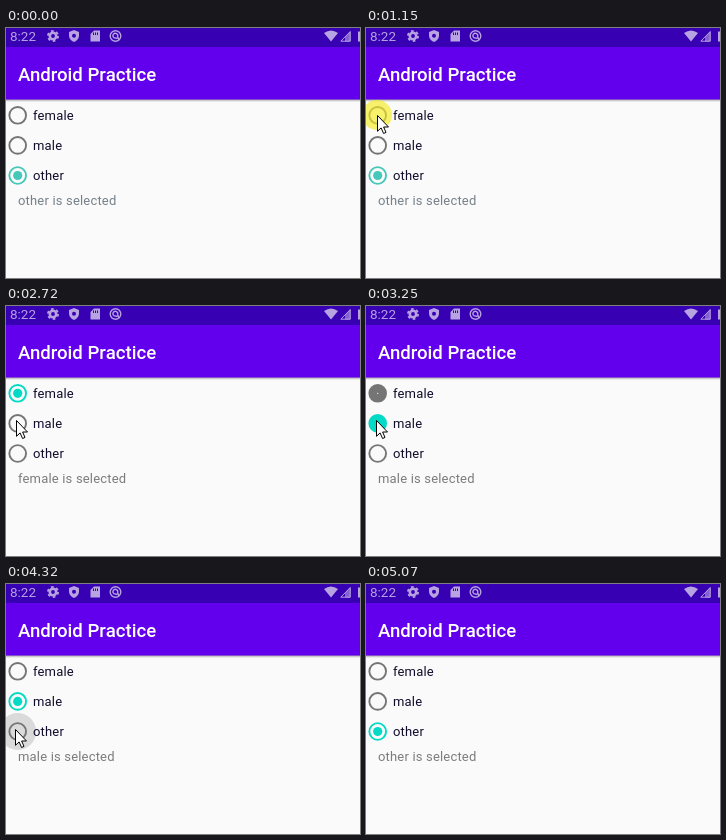
Animation of 354 by 250 pixels, one loop 5.55 s. Source, as an HTML page:

```html
<!DOCTYPE html>
<html lang="en">
<head>
<meta charset="utf-8">
<title>Radio buttons</title>
<style>
  html, body { margin: 0; width: 100%; height: 100%; overflow: hidden; background: #fafafa; }
  svg { display: block; width: 354px; height: 250px; }
  text { font: 13px Roboto, sans-serif; letter-spacing: .18px; fill: #120c2b; }
  #result { fill: #757575; }
  .title { font-size: 18.6px; font-weight: 500; letter-spacing: 0; fill: #fff; }
  .status { fill: #b7a2e2; }
  .status text { font-size: 13.5px; letter-spacing: 0; fill: inherit; }
</style>
</head>
<body>
<svg viewBox="0 0 354 250">
  <defs>
    <linearGradient id="shade" x2="0" y2="1">
      <stop stop-color="#999"/>
      <stop offset="1" stop-color="#fafafa"/>
    </linearGradient>
  </defs>
  <rect width="354" height="250" fill="#fafafa"/>
  <circle id="ripple" cx="11.7" r="18.5"/>
  <g id="radios"></g>
  <text id="result" x="12" y="177"></text>
  <rect y="71" width="354" height="3" fill="url(#shade)"/>
  <rect width="354" height="71.5" fill="#6200ee"/>
  <rect width="354" height="19" fill="#3700b3"/>
  <text class="title" x="12" y="53">Android Practice</text>
  <g class="status">
    <text x="4" y="13">8:22</text>
    <g fill="none" stroke="#b7a2e2">
      <circle cx="47" cy="8" r="3.2" stroke-width="2.6"/>
      <circle cx="47" cy="8" r="5.1" stroke-width="1.8" stroke-dasharray="2.67"/>
      <circle cx="109.5" cy="8" r="5.3" stroke-width="1.4"/>
      <path d="M111.5 10.5 107.8 9.6A2.4 2.4 0 1 1 111.6 8.6L113 12" stroke-width="1.3"/>
      <path d="M334.8 13.2H344.2V3.6Z"/>
    </g>
    <path d="M68 2 73 4V8Q72.500 12 68 14 63.500 12 63 8V4Z"/>
    <circle cx="68" cy="7.800" r="2" fill="#3700b3"/>
    <path d="M88 2.500H94V13.500H84.500V6Z"/>
    <path d="M87.500 4.500V7M89.500 4.500V7M91.500 4.500V7" stroke="#3700b3"/>
    <path d="M318 5Q325 0 332 5L325 13.500Z"/>
    <path d="M339 13.500V9L344.500 3V13.500Z" opacity=".6"/>
    <path d="M352 3.500H354V13.500H352Z"/>
  </g>
  <circle id="click" r="15" fill="#f5eb1e" fill-opacity=".65"/>
  <path id="cursor" d="M.5.5V16.300L4.100 12.900 6.600 18.500 9 17.400 6.600 12H11.500Z" fill="#fff" stroke="#000"/>
</svg>
<script>
const LOOP = 5550, SPIN = 490, R = 9.3, INNER = 7.4, DOT = 4.6;
const names = ['female', 'male', 'other'];
const presses = [1150, 2890, 4180];
const $ = id => document.getElementById(id);
const set = (el, attrs) => { for (const k in attrs) el.setAttribute(k, attrs[k]); };
const clamp = x => Math.min(1, Math.max(0, x));
const mix = (a, b, p) => a + (b - a) * p;
const rowY = i => 87.3 + 30.1 * i;

const easeIn = p => p * p;
const easeOut = p => 1 - (1 - p) ** 2;
const easeBoth = p => p * p * (3 - 2 * p);
const linear = p => p;

// time, x, y, easing towards this point
const track = [
  [70, 231, 238],
  [600, 13, 96, easeOut],
  [900, 11, 87, easeOut],
  [2050, 11, 87, linear],
  [2720, 10, 114, easeBoth],
  [3480, 10, 114, linear],
  [4020, 9, 145, easeBoth],
  [4690, 9, 145, linear],
  [4850, 63, 163, easeIn],
  [5000, 226, 229, linear],
  [5070, 300, 260, linear]
];

function make(tag, attrs) {
  const el = document.createElementNS('http://www.w3.org/2000/svg', tag);
  set(el, attrs);
  $('radios').append(el);
  return el;
}

const radios = names.map((name, i) => {
  const at = { cx: 11.7, cy: rowY(i) };
  make('text', { x: 27, y: 92 + 30 * i }).textContent = name;
  return { ring: make('circle', { ...at, fill: 'none' }), dot: make('circle', at) };
});

function pointer(t) {
  const i = track.findIndex(k => k[0] > t);
  if (i < 1) return null;
  const [t0, x0, y0] = track[i - 1], [t1, x1, y1, ease] = track[i];
  const p = ease((t - t0) / (t1 - t0));
  return [mix(x0, x1, p), mix(y0, y1, p)];
}

// Turning on closes the ring to a disc, then frees the dot; turning off reverses it.
function drawRadio({ ring, dot }, on, p, color) {
  const mid = on ? .4 : .33, early = p < mid;
  const q = early ? p / mid : (p - mid) / (1 - mid);
  let hole = INNER, r = 0;
  if (on) early ? hole = mix(INNER, 0, q) : r = mix(INNER, DOT, q);
  else early ? r = mix(DOT, INNER, q) : hole = mix(0, INNER, q);
  set(ring, { r: (R + hole) / 2, 'stroke-width': R - hole, stroke: color });
  set(dot, { r, fill: color });
}

function draw(t) {
  const starts = presses.map(c => c + 170);
  const turn = starts.filter(s => s <= t).length;
  const chosen = (turn + 2) % 3, left = (turn + 1) % 3;
  const p = turn ? clamp((t - starts[turn - 1]) / SPIN) : 1;
  const teal = turn ? '#03dac5' : '#45c7ba';
  radios.forEach((radio, i) => {
    const on = i === chosen;
    drawRadio(radio, on, on || i === left ? p : 1, on ? teal : '#757575');
  });
  $('result').textContent = names[chosen] + ' is selected';
  $('result').style.fill = turn ? '#7c7c7c' : '#75808a';

  const row = presses.findLastIndex(c => c <= t);
  const age = row < 0 ? LOOP : t - presses[row];
  const glow = clamp((age - 60) / 80) * clamp((330 - age) / 130);
  set($('ripple'), { cy: rowY(Math.max(0, row)), opacity: .13 * glow });

  const at = pointer(t);
  $('cursor').style.display = at ? '' : 'none';
  $('click').style.display = at && age < 130 ? '' : 'none';
  if (at) {
    const transform = `translate(${at})`;
    set($('cursor'), { transform });
    set($('click'), { transform });
  }
}

function tick() {
  draw(performance.now() % LOOP);
  requestAnimationFrame(tick);
}
tick();
</script>
</body>
</html>
```
